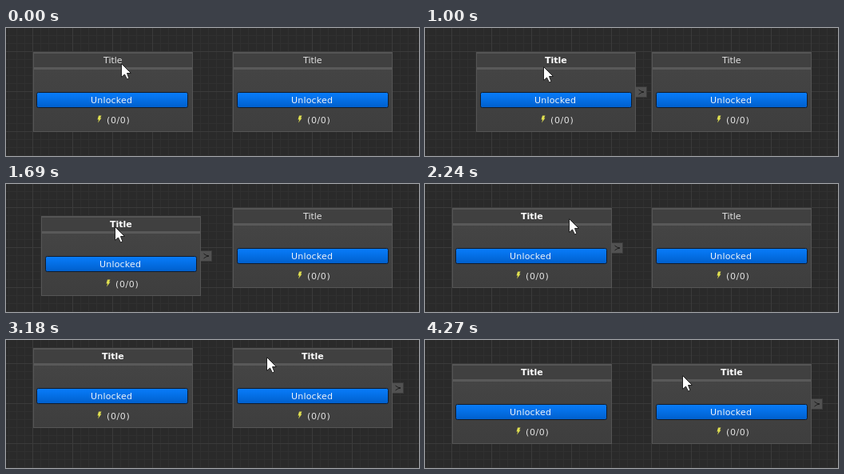
An HTML page with a canvas that plays this animation: 517 px wide and 160 px high, repeating every 4.67 s.

```html
<!DOCTYPE html>
<html>
<head>
<meta charset="utf-8">
<style>
html, body { margin: 0; width: 517px; height: 160px; overflow: hidden; background: #2a2a2a; }
canvas { display: block; }
</style>
</head>
<body>
<canvas id="stage" width="517" height="160"></canvas>
<script>
const ctx = document.getElementById('stage').getContext('2d');
const LOOP = 4670, TICK = 77.2;

// Pointer strokes as key points [tick, x, y]; the pointer rests between strokes
const strokes = [
  [[0, 144, 44], [3, 142, 50]],
  [[5, 123, 48], [8, 130, 30], [11, 151, 42], [14, 133, 56],
   [16, 120, 42], [18, 134, 35], [20, 141, 50], [22, 131, 55]],
  [[25, 130, 52], [26, 124, 48]],
  [[29, 180, 43], [31, 300, 44]],
  [[32, 322, 44], [35, 303, 41], [38, 312, 17], [41, 326, 21], [42, 324, 18]],
  [[44, 312, 26], [46, 327, 43], [49, 312, 46]],
  [[51, 316, 45], [52, 322, 44]]
];

function spline(a, b, c, d, u) {
  const m = (c - a) / 2, n = (d - b) / 2;
  return b + m * u + (3 * (c - b) - 2 * m - n) * u * u + (2 * (b - c) + m + n) * u * u * u;
}

function pointer(k) {
  const s = strokes.findLast(p => p[0][0] <= k);
  const i = s.findLastIndex(p => p[0] <= k);
  const b = s[i], c = s[i + 1];
  if (!c) return b.slice(1);
  const a = s[i - 1] || b, d = s[i + 2] || c;
  const u = (k - b[0]) / (c[0] - b[0]);
  return [1, 2].map(j => Math.round(spline(a[j], b[j], c[j], d[j], u)));
}

function rect(x, y, w, h, fill) {
  ctx.fillStyle = fill;
  ctx.fillRect(x, y, w, h);
}

function fade(y, h, top, bottom) {
  const g = ctx.createLinearGradient(0, y, 0, y + h);
  g.addColorStop(0, top);
  g.addColorStop(1, bottom);
  return g;
}

function shape(points, x, y, fill, stroke) {
  ctx.beginPath();
  points.forEach(([a, b]) => ctx.lineTo(x + a, y + b));
  ctx.closePath();
  ctx.fillStyle = fill;
  ctx.fill();
  if (stroke) { ctx.strokeStyle = stroke; ctx.stroke(); }
}

function text(str, x, y, color, bold, spacing = 0) {
  ctx.font = (bold ? 'bold ' : '') + '11px "DejaVu Sans", sans-serif';
  ctx.letterSpacing = spacing + 'px';
  ctx.fillStyle = color;
  ctx.fillText(str, x, y);
}

function grid() {
  rect(0, 0, 517, 160, '#2a2a2a');
  for (const [gap, color] of [[10, '#303030'], [50, '#3b3b3b']]) {
    for (let x = 33 % gap; x < 517; x += gap) rect(x, 0, 1, 160, color);
    for (let y = 29 % gap; y < 160; y += gap) rect(0, y, 517, 1, color);
  }
}

function port(x, y) {
  rect(x, y, 14, 14, '#3a3a3a');
  rect(x, y + 1, 13, 12, '#515151');
  ctx.beginPath();
  ctx.moveTo(x + 3.5, y + 4);
  ctx.quadraticCurveTo(x + 6, y + 6.5, x + 10, y + 7);
  ctx.quadraticCurveTo(x + 6, y + 7.5, x + 3.5, y + 10);
  ctx.strokeStyle = '#1c1c1c';
  ctx.stroke();
}

const boltShape = [[2, 0], [5.5, 0], [4, 3], [5.5, 3], [1, 9], [2.2, 5], [0.5, 5]];

function node(x, y, selected, linked) {
  if (linked) port(x + 200, y + 43);
  rect(x, y, 200, 100, '#555');
  rect(x + 1, y + 2, 198, 17, '#404040');
  rect(x + 1, y + 19, 198, 3, '#595959');
  rect(x + 1, y + 22, 198, 77, fade(y + 22, 77, '#444', '#3e3e3e'));
  text('Title', x + (selected ? 86 : 88), y + 14, selected ? '#fff' : '#e4e4e4', selected);

  // The view is zoomed a touch, so contents round to their own pixel
  const cx = Math.round(x * 1.0025 + 0.4);
  ctx.beginPath();
  ctx.roundRect(cx + 4.5, y + 50.5, 189, 19, 2);
  ctx.fillStyle = fade(y + 51, 18, '#087cfa', '#0060cd');
  ctx.fill();
  ctx.strokeStyle = '#101b2b';
  ctx.stroke();
  text('Unlocked', cx + 72, y + 64, '#f0f4fa', false, 0.2);
  shape(boltShape, cx + 80, y + 79.5, '#dfdf50');
  text('(0/0)', cx + 92, y + 89, '#e4e4e4', false, 0.6);
}

const arrowShape = [[0, 0], [0, 17], [4, 13.5], [7, 19.5], [9.5, 18.5], [7, 12], [12, 12]];
const cells = v => Math.round(v / 10) * 10;

function draw(t) {
  const k = Math.floor(t / TICK);
  const [px, py] = pointer(k);
  const first = k >= 5, both = k >= 32;
  let ax = 34, ay = 30, bx = 284, by = 30;
  if (both) {
    // The nodes snap to opposite sides at half a cell
    const d = px - 322;
    ax += Math.floor((d + 5) / 10) * 10;
    bx += Math.ceil((d - 5) / 10) * 10;
    ay = by = 30 + cells(py - 44);
  } else if (first && k < 29) {
    ax += cells(px - 123);
    ay += cells(py - 47);
  }
  grid();
  node(ax, ay, first, first && !both);
  node(bx, by, both, both);
  shape(arrowShape, px + 0.5, py + 0.5, '#fff', '#222');
}

const start = performance.now();
function tick() {
  draw((performance.now() - start) % LOOP);
  requestAnimationFrame(tick);
}
tick();
</script>
</body>
</html>
```
